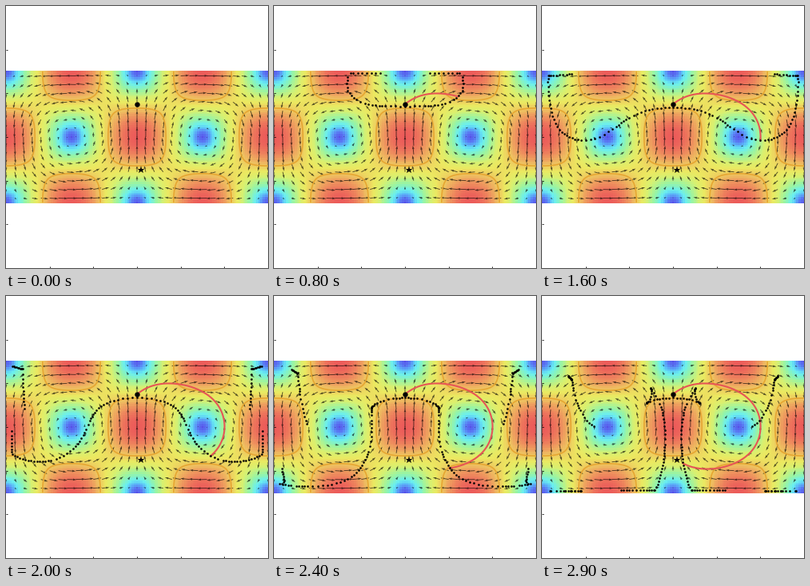
Recreate the animation shown at these times as a matplotlib script. Size 328 by 328 pixels, loop 3 s.

```python
import numpy as np
import matplotlib.pyplot as plt
from matplotlib.animation import FuncAnimation
from matplotlib.colors import LinearSegmentedColormap

FRAMES, INTERVAL = 30, 100
FLOW, SWIM = 1.3, 1.0          # peak current and swimming speed
K = np.pi / 3
START, GOAL = (0.0, 0.75), (0.1, -0.75)
WALL_X, WALL_Y = 2.88, 1.455
MAX_GAP = 0.125
SUBSTEPS = 20


def current(x, y):
    return (FLOW * np.sin(K * x) * np.sin(K * y),
            FLOW * np.cos(K * x) * np.cos(K * y))


def rates(state):
    """Zermelo navigation: position and optimal heading."""
    x, y, h = state
    u, v = current(x, y)
    turn = FLOW * K * (np.sin(2 * h) * np.cos(K * x) * np.sin(K * y)
                       - np.sin(K * x) * np.cos(K * y))
    return np.array([u + SWIM * np.cos(h), v + SWIM * np.sin(h), turn])


def step(state, dt):
    mid = state + rates(state) * dt / 2
    return state + rates(mid) * dt


def launch(headings):
    ones = np.ones_like(headings)
    return np.array([START[0] * ones, START[1] * ones, headings])


def best_route(dt=0.005, steps=660):
    """Shoot a fan of headings and keep the one that meets the goal."""
    state = launch(np.radians(np.linspace(-45, 5, 1001)))
    track = [state]
    for _ in range(steps):
        state = step(state, dt)
        track.append(state)
    track = np.array(track)
    miss = np.hypot(track[:, 0] - GOAL[0], track[:, 1] - GOAL[1])
    end, ray = np.unravel_index(miss.argmin(), miss.shape)
    return track[:end + 1, :2, ray], end * dt


def meet_walls(state):
    """Slide along walls; a head-on hit on a side wall turns back."""
    x, y, h = state
    h = np.where(abs(y) > WALL_Y, np.round(h / np.pi) * np.pi, h)
    upright = (np.floor(h / np.pi) + 0.5) * np.pi
    side = np.where(abs(np.sin(h)) < 0.15, np.pi - h, upright)
    h = np.where(abs(x) > WALL_X, side, h)
    return np.array([np.clip(x, -WALL_X, WALL_X),
                     np.clip(y, -WALL_Y, WALL_Y), h])


def refine(state):
    """Add a point in each wide gap that is clear of the walls."""
    x, y, h = state
    free = (abs(x) < WALL_X) & (abs(y) < WALL_Y)
    gap = np.hypot(np.diff(x), np.diff(y))
    split = ((gap > MAX_GAP) & free[1:] & free[:-1]
             & (abs(np.diff(h)) < 1))
    wide = np.flatnonzero(split)
    mids = (state[:, wide] + state[:, wide + 1]) / 2
    return np.insert(state, wide + 1, mids, axis=1)


def wavefronts(dt):
    state = launch(np.radians(np.arange(-260, 81, 10)))
    fronts = [state[:2, :0]]
    for _ in range(FRAMES - 1):
        for _ in range(SUBSTEPS):
            state = meet_walls(step(state, dt / SUBSTEPS))
        state = refine(state)
        fronts.append(state[:2])
    return fronts


route, arrival = best_route()
fronts = wavefronts(arrival / FRAMES)

fig = plt.figure(figsize=(3.28, 3.28), dpi=100)
ax = fig.add_axes([0, 0, 1, 1])
ax.spines[:].set_visible(False)
ax.set_xticks(range(-2, 3))
ax.set_yticks(range(-2, 3))
ax.tick_params(direction="in", length=1.6, width=0.6,
               labelbottom=False, labelleft=False)

heat = LinearSegmentedColormap.from_list("heat", [
    (0.00, "#5850e8"), (0.12, "#5a7cf4"), (0.21, "#5cbef8"),
    (0.30, "#6aeff0"), (0.45, "#98f4a4"), (0.60, "#d8f070"),
    (0.69, "#ece860"), (0.79, "#eec060"), (0.89, "#ee905e"),
    (1.00, "#ec5c5a")])
gx, gy = np.meshgrid(np.linspace(-3, 3, 121), np.linspace(-1.5, 1.5, 61))
speed = np.hypot(*current(gx, gy))
ax.pcolormesh(gx, gy, speed, cmap=heat, vmin=0, vmax=FLOW, shading="nearest")
ax.contour(gx, gy, speed, levels=[SWIM], colors="#e6a632", linewidths=1.2)

qx, qy = np.meshgrid(np.arange(-15, 16) * 0.2, np.arange(-7, 8) * 0.2)
ax.quiver(qx, qy, *current(qx, qy), color="black", alpha=0.65)

path, = ax.plot([], [], color="#e65555", lw=1.5, zorder=4)
dots, = ax.plot([], [], "o", color="black", ms=1.9, mew=0, zorder=5)
ax.plot(*START, "o", color="black", ms=4.6, mew=0, zorder=6)
ax.plot(*GOAL, "*", color="black", ms=6.8, mew=0, zorder=6)
ax.set(xlim=(-3, 3), ylim=(-3, 3))


def draw(i):
    shown = round(i / FRAMES * (len(route) - 1)) + 1 if i else 0
    path.set_data(route[:shown, 0], route[:shown, 1])
    dots.set_data(*fronts[i])
    return path, dots


anim = FuncAnimation(fig, draw, frames=FRAMES, interval=INTERVAL,
                     repeat=True, repeat_delay=0)
plt.show()
```
